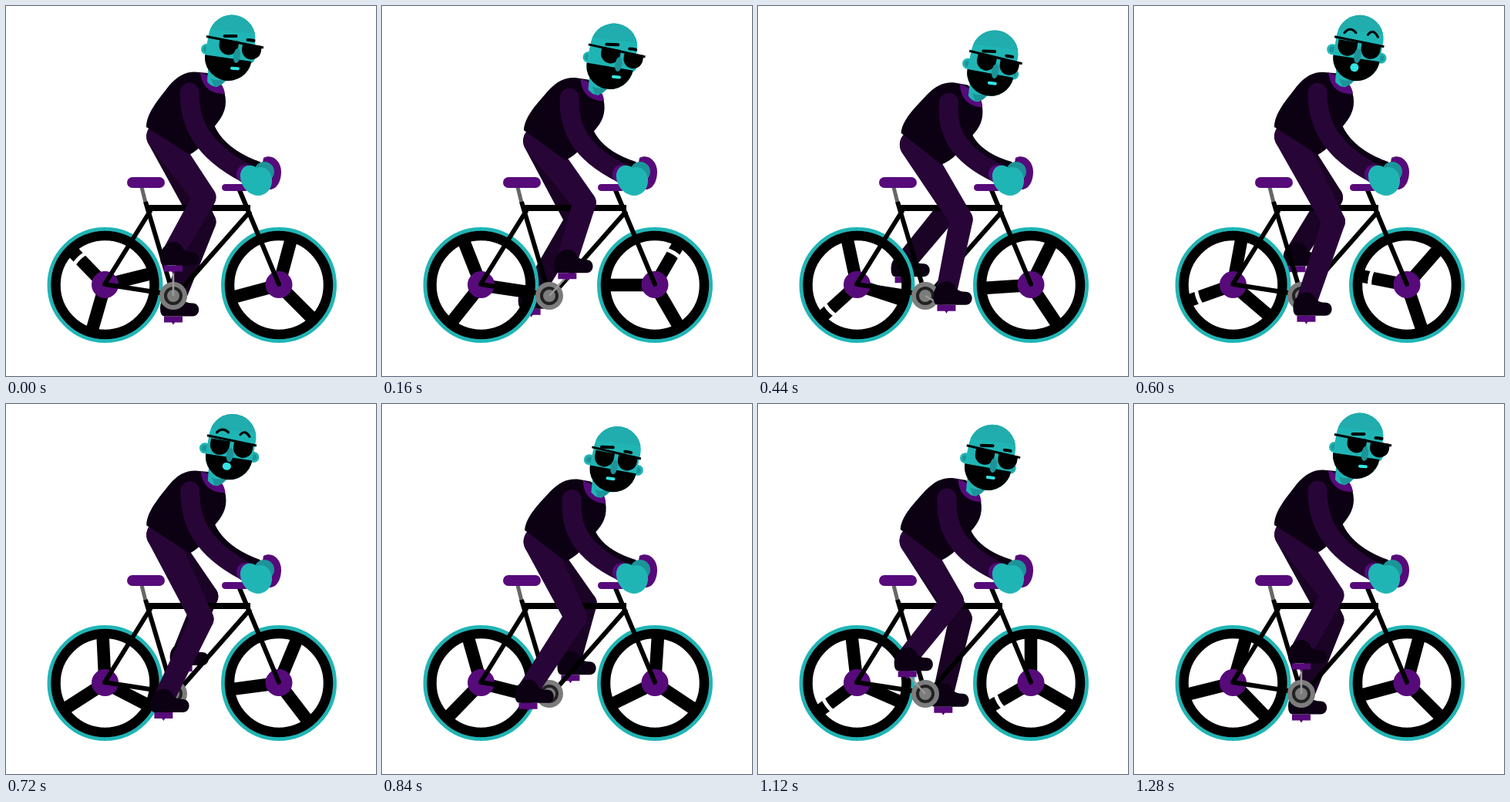
An HTML page that plays this animation: 480 by 480 pixels, repeating every 1320 ms.

```html
<!DOCTYPE html>
<html lang="en">
<head>
<meta charset="utf-8">
<title>Cyclist</title>
<style>
  html, body { margin: 0; width: 100%; height: 100%; overflow: hidden; background: #fff; }
  svg { display: block; width: 100%; height: 100%; }
</style>
</head>
<body>
<svg id="stage" viewBox="0 0 480 480"></svg>
<script>
const LOOP = 1320, STEP = 40, TURN = 1280;
const TEAL = '#20b5b5', TEAL_DARK = '#1c9499', HAIR = '#21acad', MOUTH = '#35e6e6';
const PURPLE = '#570a7a', LEG = '#280537', LEG_FAR = '#1a0324', SHOE = '#0c0013', SHIRT = '#0c0013';
const stage = document.getElementById('stage');

const rad = d => d * Math.PI / 180;
const ramp = (t, a, b) => Math.min(1, Math.max(0, (t - a) / (b - a)));
const smooth = u => u * u * (3 - 2 * u);
const cubic = u => u < .5 ? 4 * u ** 3 : 1 - 4 * (1 - u) ** 3;
const n = v => +v.toFixed(2);

const shape = (d, fill) => `<path d="${d}" fill="${fill}"/>`;
const line = (d, color, w, cap = 'butt') =>
  `<path d="${d}" fill="none" stroke="${color}" stroke-width="${w}" stroke-linecap="${cap}" stroke-linejoin="round"/>`;
const disc = (x, y, r, fill) => `<circle cx="${n(x)}" cy="${n(y)}" r="${r}" fill="${fill}"/>`;
const group = (transform, body) => `<g transform="${transform}">${body}</g>`;

// Tapered limb with round ends.
function limb([x1, y1], r1, [x2, y2], r2) {
  const len = Math.hypot(x2 - x1, y2 - y1);
  const nx = -(y2 - y1) / len, ny = (x2 - x1) / len;
  const p = (x, y, r) => `${n(x + nx * r)} ${n(y + ny * r)}`;
  return `M${p(x1, y1, r1)}A${r1} ${r1} 0 0 1 ${p(x1, y1, -r1)}` +
    `L${p(x2, y2, -r2)}A${r2} ${r2} 0 0 1 ${p(x2, y2, r2)}Z`;
}

function wheel(cx, angle, glint) {
  let s = '';
  for (let i = 0; i < 3; i++) {
    const mark = i === glint ? line('M47.5 -9Q49.5 0 47.5 9', '#fff', 5) : '';
    s += group(`rotate(${n(angle + i * 120)})`, line('M0 0H62', '#000', 16.5) + mark);
  }
  return group(`translate(${cx} 362)`,
    `<circle r="72.5" fill="none" stroke="${TEAL}" stroke-width="5"/>` +
    `<circle r="64" fill="none" stroke="#000" stroke-width="12.5"/>` +
    s + disc(0, -.5, 17.5, PURPLE));
}

// Spoke that shines for a moment: [start, spoke].
const glintAt = (t, list) => {
  const hit = list.find(([start]) => t >= start && t < start + 80);
  return hit ? hit[1] : -1;
};

const pedalAt = a => [217 + 33 * Math.sin(a), 373.5 - 33 * Math.cos(a)];

function pedal([x, y]) {
  return group(`translate(${n(x)} ${n(y)})`, shape('M-12 -4H12V4H2L0 7L-2 4H-12Z', PURPLE));
}

function leg(a, bob, color) {
  const hip = [201 + 2 * bob, 169 + 12 * bob];
  const knee = [257.5 + 7.5 * Math.sin(a), 264 - 16 * Math.cos(a) + 4.5 * bob];
  const [px, py] = pedalAt(a);
  const ankle = [px, py - 21];
  return shape(limb(hip, 19, knee, 15), color) +
    shape(limb(knee, 15, ankle, 13.5), color) +
    disc(...ankle, 13.5, SHOE) +
    group(`translate(${n(px)} ${n(py)})`,
      shape('M-17 -14C-17 -22 -14 -26 -12 -28L12 -26Q16 -21 25 -21C36 -21 36 -4 25 -4H-11Q-17 -4 -17 -14Z', SHOE));
}

function bikeFrame() {
  return line('M176 235L181 255', '#666', 5) +
    line('M181 254L217 375M317 266L221 375', '#000', 6) +
    line('M183 262H317', '#000', 8) +
    line('M187 266L128 361L212 374', '#000', 6, 'round') +
    line('M303 239L354 361', '#000', 6, 'round') +
    `<rect x="157" y="222" width="49" height="14" rx="7" fill="${PURPLE}"/>` +
    `<rect x="280" y="231" width="35" height="9" rx="4.5" fill="${PURPLE}"/>`;
}

function chainring(a) {
  const [x, y] = pedalAt(a);
  return disc(217, 376, 18, '#7c7c7c') +
    '<circle cx="217" cy="376" r="10" fill="none" stroke="#222" stroke-width="4"/>' +
    line(`M217 376L${n(x)} ${n(y)}`, '#999', 2.5);
}

function torso(bob) {
  return group(`translate(${n(2 * bob)} ${n(11 * bob)}) rotate(${n(6 * bob)} 207 175)`,
    shape('M182 157C182 139 198 121 211 104C222 91 232 85.5 245 85.5L262 87C277 96 285 108 285 124' +
      'C285 140 276 149 270 157C262 172 252 186 238 193Q212 176 182 157Z', SHIRT) +
    shape('M252 86C254 104 264 114 284 114C283 105 278 99 272 94Z', PURPLE));
}

function armPath(x, y, dx, dy, c) {
  return `M${n(x + dx)} ${n(y + dy)}C${n(c[0] + dx * .7)} ${n(c[1] + dy * .7)} ` +
    `${n(c[2] + dx * .4)} ${n(c[3] + dy * .4)} ${c[4]} ${c[5]}`;
}

function hands() {
  return shape('M334 197C346 191 357 202 357 215C357 229 350 239 341 238L330 220Z', PURPLE) +
    disc(335, 215, 13, TEAL_DARK) +
    disc(311, 218, 12, PURPLE) +
    shape('M304 222C303 208 316 203 325 210C334 206 344 214 345 224C346 238 337 246 326 246C316 245 305 236 304 222Z', TEAL);
}

// k: how far the face has turned; open: surprise.
function head(bob, k, open) {
  const skull = limb([293, 42], 30.5, [288.5, 66.5], 30.5);
  const lens = (x, y) => group(`translate(${n(x)} ${n(y)}) rotate(9)`,
    shape('M-12.5 -7H12.5V0A12.5 12.5 0 0 1 -12.5 0Z', '#000'));
  const brow = (x, y, w, tilt) =>
    line(`M${n(x)} ${n(y)}q${n(w / 2)} ${n(-9 * open)} ${w} ${tilt}`, '#000', n(4 - open), 'round');
  const ear = x => disc(x, 0, 7, TEAL) + disc(x, 0, 4, TEAL_DARK);
  const mx = 297 - 11.5 * k, my = 81 - 1.5 * k;
  const neck = shape('M262 82L261 98Q266 105 274 105L287 96V80Z', TEAL) +
    shape('M266 94Q276 99 287 93L283 99Q278 105 270 104Z', TEAL_DARK);
  return group(`translate(${n(15 * bob)} ${n(22 * bob)}) rotate(${n(2.5 * bob)} 290 55)`,
    neck +
    group('translate(0 56)', ear(n(260 - 3 * k))) +
    group('translate(0 67.5)', ear(n(316 + 4.5 * k))) +
    `<clipPath id="skull"><path d="${skull}"/></clipPath>` +
    shape(skull, TEAL) +
    `<g clip-path="url(#skull)">` +
      shape('M255 5H330V37L255 29Z', HAIR) +
      shape('M250 62L325 73V100H250Z', '#000') +
    '</g>' +
    lens(289 - 12.5 * k, 51 + k) + lens(318.5 - 12 * k, 57 - k) +
    group(`translate(${n(299.5 - 10 * k)} 64.5) rotate(8)`,
      `<ellipse rx="4.5" ry="9.5" fill="${TEAL_DARK}"/>`) +
    line(`M260 39.5L${n(334 - 10 * k)} ${n(54 - 1.5 * k)}`, '#000', 3) +
    brow(283.5 - 11 * k, 39 - 4.5 * open, 15, 0) +
    brow(313.5 - 10.5 * k, 44 - 7 * open, 8 + 5 * open, 1 + 2 * open) +
    group(`translate(${n(mx)} ${n(my)}) rotate(5)`,
      `<rect x="${n(-6 + .5 * open)}" y="${n(-2 - 3.5 * open)}" width="${n(12 - open)}" ` +
      `height="${n(4 + 7 * open)}" rx="${n(2 + 3.5 * open)}" fill="${MOUTH}"/>`));
}

function draw(t) {
  const a = rad(360 * t / TURN), far = a + Math.PI;
  const half = t % 640;
  const bob = half < 340 ? cubic(ramp(half, 0, 320)) : 1 - cubic(ramp(half, 360, 640));
  const turn = smooth(ramp(t, 240, 640)) * (1 - smooth(ramp(t, 920, TURN)));
  const open = smooth(ramp(t, 460, 600)) * (1 - smooth(ramp(t, 680, 820)));
  const dx = 10.5 * bob, dy = 14.5 * bob;

  stage.innerHTML =
    pedal(pedalAt(far)) + leg(far, bob, LEG_FAR) +
    wheel(128.5, 106 + 1140 * t / TURN, glintAt(t, [[0, 1], [440, 0], [600, 2], [1120, 1]])) +
    wheel(354, 45 + 1080 * t / TURN, glintAt(t, [[160, 1], [600, 0], [1120, 2]])) +
    bikeFrame() + chainring(a) +
    leg(a, bob, LEG) + pedal(pedalAt(a)) +
    line(armPath(261, 125, dx, dy, [256, 154, 273, 188, 328, 208]), SHIRT, 12) +
    torso(bob) +
    line(armPath(238, 112, dx, dy, [238, 152, 254, 187, 311, 217]), LEG, 25, 'round') +
    hands() + head(bob, turn, open);
}

let begin = null, shown = -1;
function tick(now) {
  if (begin === null) begin = now;
  const t = Math.floor(((now - begin) % LOOP) / STEP) * STEP;
  if (t !== shown) draw(shown = t);
  requestAnimationFrame(tick);
}
draw(0);
requestAnimationFrame(tick);
</script>
</body>
</html>
```
